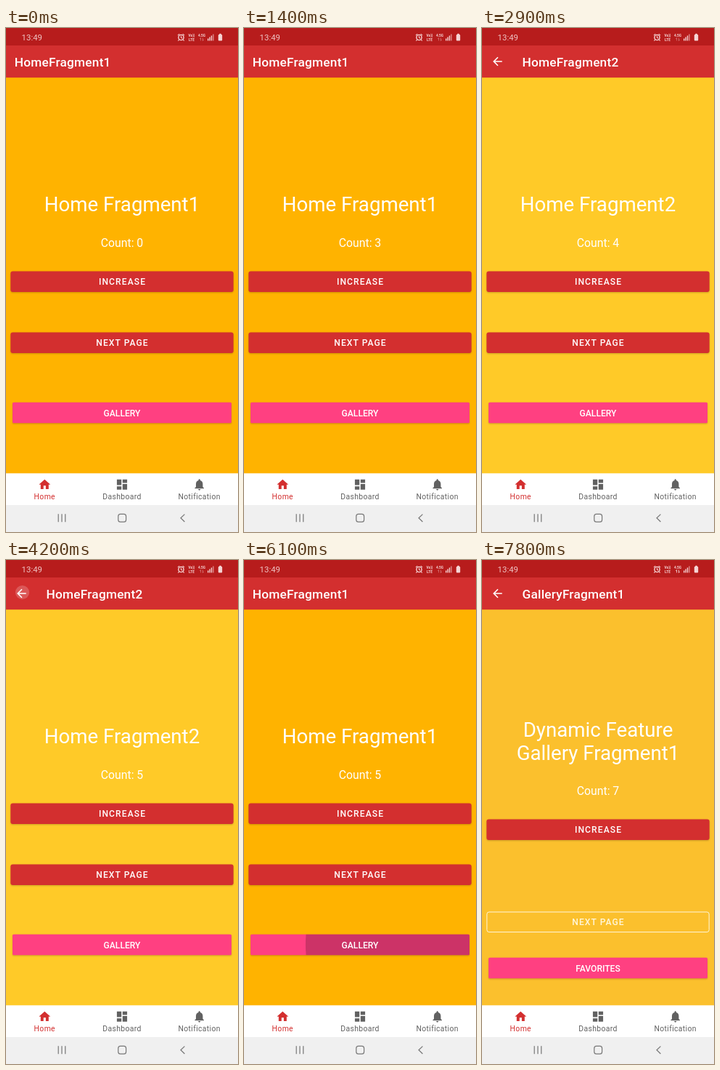
Recreate the animation shown at these times as an HTML page. Size 320 by 693 pixels, loop 8000 ms.

```html
<!DOCTYPE html>
<html lang="en">
<head>
<meta charset="utf-8">
<title>Fragment navigation</title>
<style>
html, body { margin: 0; width: 100%; height: 100%; overflow: hidden; }
svg { display: block; width: 100%; height: 100%; font-family: Roboto, sans-serif; }
.mid { text-anchor: middle; }
.title { font-size: 17.3px; font-weight: 500; letter-spacing: .2px; }
.heading { font-size: 27.66px; }
.count { font-size: 15.8px; }
.button { font-size: 12.1px; font-weight: 500; }
.spaced { letter-spacing: 1.08px; }
.label { font-size: 10.4px; letter-spacing: .35px; }
.clock { font-size: 11.4px; }
.tiny { font-size: 4.8px; font-weight: 700; }
</style>
</head>
<body>
<svg id="stage" viewBox="0 0 320 693" preserveAspectRatio="none"></svg>
<script>
const LOOP = 8000, STEP = 100;
const RED = '#d32f2f', PINK = '#ff4081', GREY = '#616161';

const ICONS = {
  home: 'M10 20v-6h4v6h5v-8h3L12 3 2 12h3v8z',
  dashboard: 'M3 13h8V3H3zm0 8h8v-6H3zm10 0h8V11h-8zm0-18v6h8V3z',
  bell: 'M12 22c1.1 0 2-.9 2-2h-4c0 1.1.9 2 2 2zm6-6v-5c0-3.07-1.64-5.64-4.5-6.32V4a1.5 1.5 0 0 0-3 0v.68C7.63 5.36 6 7.92 6 11v5l-2 2v1h16v-1z',
  back: 'M20 11H7.83l5.59-5.59L12 4l-8 8 8 8 1.41-1.41L7.83 13H20z'
};

const HOME1 = { title: 'HomeFragment1', heading: ['Home Fragment1'], color: '#ffb300' };
const HOME2 = { title: 'HomeFragment2', heading: ['Home Fragment2'], color: '#ffca28', back: true };
const GALLERY = { title: 'GalleryFragment1', heading: ['Dynamic Feature', 'Gallery Fragment1'],
  color: '#fbc02d', back: true, gallery: true };

const PAGES = [[0, HOME1], [1900, HOME2], [4400, HOME1], [6300, GALLERY]];
const INCREASE_TAPS = [430, 680, 900, 2450, 2900, 7130, 7400];
const NEXT_TAPS = [1700], GALLERY_TAPS = [6000], BACK_TAPS = [4110];
const CLICK_DELAY = 80;

const clamp = v => Math.max(0, Math.min(1, v));
const text = (x, y, cls, str, fill = '#fff') =>
  `<text x="${x}" y="${y}" class="${cls}" fill="${fill}">${str}</text>`;
const rect = (x, y, w, h, fill, more = '') =>
  `<rect x="${x}" y="${y}" width="${w}" height="${h}" fill="${fill}" ${more}/>`;
const icon = (name, cx, cy, fill) =>
  `<path d="${ICONS[name]}" fill="${fill}" transform="translate(${cx} ${cy}) scale(.786) translate(-12 -12)"/>`;
const line = (d, color, width) =>
  `<path d="${d}" fill="none" stroke="${color}" stroke-width="${width}"/>`;

// A ripple fills quickly, spreads for 225 ms and is gone after 400 ms.
function ripples(t, taps, cx, cy, size, color, strength) {
  return taps.map(tap => {
    const age = t - tap;
    if (age <= 0 || age >= 400) return '';
    const spread = 1 - (1 - clamp(age / 225)) ** 2;
    const alpha = strength * clamp(age / 75) * clamp((400 - age) / 175);
    return `<circle cx="${cx}" cy="${cy}" r="${size * spread}" fill="${color}" opacity="${alpha}"/>`;
  }).join('');
}

function button(t, y, label, { fill = RED, x = 6.3, r = 3, taps = [], ripple = '#fff', strength = .24, spaced = true } = {}) {
  const w = 320 - 2 * x, h = 28.6, id = 'clip' + label[0], round = `rx="${r}"`;
  return rect(x, y + 1, w, h, '#000', round + ' opacity=".2" filter="url(#soft)"') +
    rect(x, y, w, h, fill, round) +
    `<clipPath id="${id}">${rect(x, y, w, h, '#000', round)}</clipPath>` +
    `<g clip-path="url(#${id})">${ripples(t, taps, 237, y + 14, 220, ripple, strength)}</g>` +
    text(spaced ? 160.5 : 160, y + 18.8, 'mid button' + (spaced ? ' spaced' : ''), label);
}

function statusBar(t) {
  const pale = '#f6d5d5';
  const bars = [3, 5, 7, 9].map((h, i) => rect(278 + i * 2.4, 17.5 - h, 1.4, h, pale, i > 2 ? 'opacity=".6"' : '')).join('');
  return rect(0, 0, 320, 24.3, '#b71c1c') + text(21.6, 17, 'clock', '13:49', '#efc4c4') +
    `<circle cx="241.5" cy="13" r="3.6" fill="none" stroke="${pale}" stroke-width="1.4"/>` +
    line('M241.5 10.8V13.3L243.2 14.3M236.9 10.2L239.3 8.2M246.1 10.2L243.7 8.2M238.7 16L237.4 17.6M244.3 16L245.6 17.6', pale, 1.1) +
    text(256, 12, 'mid tiny', 'Vo))', pale) + text(256, 17.5, 'mid tiny', 'LTE', pale) +
    text(270, 12, 'mid tiny', '4.5G', pale) +
    `<g opacity="${t >= 6300 ? 1 : .45}">${line('M268.6 17.5V13.6L267.3 15M271.4 13.6V17.5L272.7 16', pale, .9)}</g>` +
    bars + rect(292.8, 9, 5.4, 8.6, pale, 'rx="1"') + rect(294.2, 7.8, 2.6, 2, pale);
}

function appBar(t, page) {
  return rect(0, 24, 320, 44.2, RED) +
    (page.back ? ripples(t, BACK_TAPS, 22.5, 44.5, 15, '#fff', .2) + icon('back', 21.4, 46, '#fff') : '') +
    text(page.back ? 55.6 : 11.8, 53, 'title', page.title);
}

function content(t, page) {
  const count = INCREASE_TAPS.filter(tap => t >= tap + CLICK_DELAY).length;
  const shift = page.gallery ? 22 : 0;
  const top = page.gallery ? 243 : 252;
  const pale = '#fff6da';
  const increase = button(t, 334.5 + shift, 'INCREASE', { taps: INCREASE_TAPS });
  const next = page.gallery
    ? rect(6.8, 484, 306.4, 27.6, 'none', `rx="3" stroke="${pale}" stroke-width="1"`) +
      text(160.5, 502.3, 'mid button spaced', 'NEXT PAGE', pale)
    : button(t, 418.5, 'NEXT PAGE', { taps: NEXT_TAPS });
  const pink = { fill: PINK, x: 9, r: 1.6, taps: GALLERY_TAPS, ripple: '#000', strength: .2, spaced: false };
  return rect(0, 68, 320, 545, page.color) +
    page.heading.map((str, i) => text(160, top + i * 31.8, 'mid heading', str)).join('') +
    text(160, 301 + shift, 'mid count', 'Count: ' + count) +
    increase + next +
    (page.gallery ? button(t, 546.7, 'FAVORITES', pink) : button(t, 514.7, 'GALLERY', pink));
}

function bottomBars() {
  const tabs = [['home', 'Home', 53.3, RED], ['dashboard', 'Dashboard', 160, GREY], ['bell', 'Notification', 266.7, GREY]];
  return rect(0, 612.3, 320, 44, '#fff') +
    tabs.map(([name, label, x, color]) => icon(name, x, 627.8, color) + text(x, 648, 'mid label', label, color)).join('') +
    rect(0, 656, 320, 37, '#f0f0f0') +
    line('M72.2 668.3V679.3M77 668.3V679.3M81.8 668.3V679.3', '#777', 1.2) +
    rect(154.8, 668.4, 10.8, 10.8, 'none', 'rx="3" stroke="#777" stroke-width="1.2"') +
    line('M246.4 668.6L241 673.8L246.4 679', '#777', 1.2);
}

const stage = document.getElementById('stage');
const SOFT = '<filter id="soft" x="-5%" y="-20%" width="110%" height="150%"><feGaussianBlur stdDeviation="1"/></filter>';
let shown = -1;

function draw(now) {
  const t = Math.floor(now % LOOP / STEP) * STEP;
  if (t !== shown) {
    shown = t;
    const page = PAGES.filter(([start]) => t >= start).pop()[1];
    stage.innerHTML = SOFT + content(t, page) + statusBar(t) + appBar(t, page) + bottomBars();
  }
}

const start = performance.now();
function tick() {
  draw(performance.now() - start);
  requestAnimationFrame(tick);
}
tick();
</script>
</body>
</html>
```
